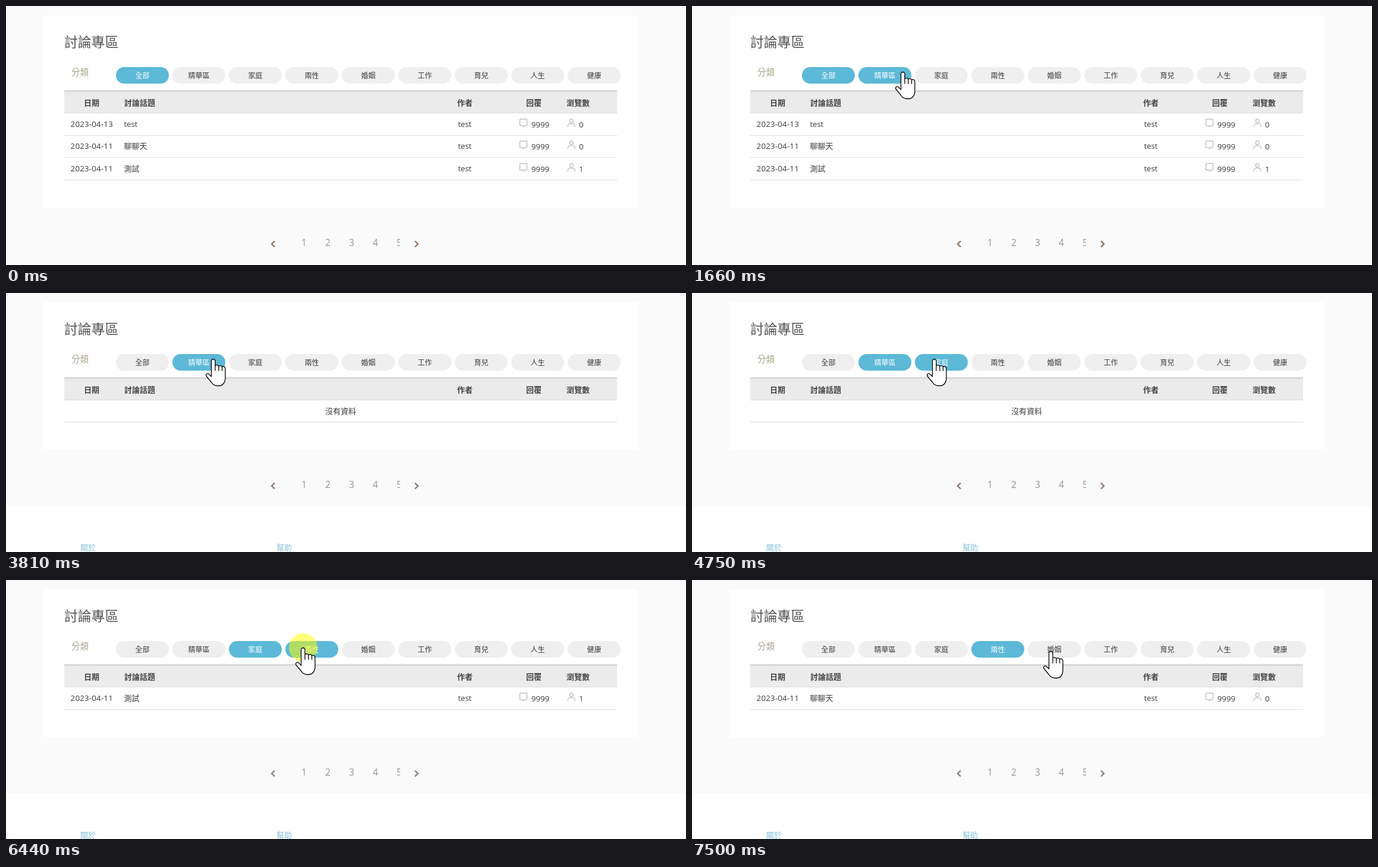
These frames come from a looping animation (1144 px wide and 437 px high, 8000 ms). An HTML page:

```html
<!DOCTYPE html>
<html lang="zh-Hant">
<head>
<meta charset="utf-8">
<title>討論專區</title>
<style>
  html, body { margin: 0; width: 100%; height: 100%; overflow: hidden; background: #fafafa; }
  #stage { display: block; width: 1144px; height: 437px; }
  text { font: 13px "Open Sans", "Noto Sans CJK TC", "Noto Sans CJK", sans-serif; fill: #3a3a3a; }
  .mid { text-anchor: middle; }
  .title { font-size: 22.8px; font-weight: 300; fill: #555; }
  .label { font-size: 14.5px; fill: #aba38f; }
  .pill { font-size: 12px; text-anchor: middle; }
  .on { fill: #fff; }
  .head { font-weight: 700; fill: #444; }
  .num { font-size: 13.3px; }
  .date { letter-spacing: .2px; }
  .page { font-size: 15.5px; fill: #939590; text-anchor: middle; }
  .foot { fill: #84c0da; }
  .icon { fill: none; stroke: #c2c2c2; stroke-width: 1.5; }
  .chevron { fill: none; stroke-width: 2.4; }
  .cursor { fill: #fff; stroke: #000; stroke-width: 1.3; stroke-linejoin: round; }
  .bare text { display: none; }
</style>
</head>
<body>
<svg id="stage" viewBox="0 0 1144 437">
  <g id="view"></g>
  <circle id="click" r="24" fill="#ff0" fill-opacity=".52"/>
  <g id="cursor" class="cursor">
    <path id="arrow" d="M1 1V32l7-6.6 5 11.6 5.5-2.4-5-11.4H24z"/>
    <path id="hand" d="M-3.500 3.700a3.200 3.200 0 0 1 6.400 0V12c1-2 5.200-2 6 .8 1-1.800 5-1.600 5.600 1 1.400-1.600 5.200-1 5.400 2.400V32c0 8-4 13.500-11 13.500h-2c-5 0-8-2-10.500-6L-11.800 29.500c-2-3.500 1.500-6 4.300-3.500L-3.500 30zM2.900 12v8.500M8.900 13v7.500M14.500 14v6.500"/>
  </g>
</svg>
<script>
const LOOP = 8000;
const categories = ['全部', '精華區', '家庭', '兩性', '婚姻', '工作', '育兒', '人生', '健康'];
const columns = [[131, '日期'], [199, '討論話題'], [759, '作者'], [875, '回覆'], [943, '瀏覽數']];
const chat = ['2023-04-11', '聊聊天', 0];
const trial = ['2023-04-11', '測試', 1];

const pages = [
  { from: 0, active: 0, rows: [['2023-04-13', 'test', 0], chat, trial], chevron: '#967462' },
  { from: 3470, textFrom: 3810, active: 1, rows: [], chevron: '#8c7a72' },
  { from: 5280, active: 2, rows: [trial], chevron: '#7a838c' },
  { from: 7500, active: 3, rows: [chat], chevron: '#7a838c' }
];

const easeOut = u => 1 - (1 - u) ** 2;
const easeInOut = u => u < .5 ? 2 * u * u : 1 - 2 * (1 - u) ** 2;

// first step, last step, number of steps, destination, easing
const moves = [
  [290, 1120, 13, 242, 145, easeOut],
  [1390, 1660, 5, 355, 111, easeInOut],
  [1930, 2070, 3, 343, 111, easeInOut],
  [3070, 3070, 1, 347, 111, easeInOut],
  [3810, 4280, 8, 408, 111, easeInOut],
  [5280, 5970, 11, 500, 114, easeInOut],
  [6820, 7300, 8, 604, 120, easeInOut]
];
const clicks = [[2340, 2480], [4680, 4750], [6440, 6570]];

const $ = id => document.getElementById(id);
const show = (id, visible) => $(id).setAttribute('visibility', visible ? 'visible' : 'hidden');
const rect = (x, y, w, h, fill, r = 0) =>
  `<rect x="${x}" y="${y}" width="${w}" height="${h}" rx="${r}" fill="${fill}"/>`;
const text = (x, y, s, cls = '') => `<text x="${x}" y="${y}" class="${cls}">${s}</text>`;
const pillX = i => 185 + 95 * i;

function pill(name, i, lit) {
  return rect(pillX(i), 103, 89, 28, lit ? '#5cb9d7' : '#efefef', 14) +
    text(pillX(i) + 44.5, 121.5, name, lit ? 'pill on' : 'pill');
}

function row([date, topic, views], i) {
  const y = Math.floor(37.5 * i);
  return `<g transform="translate(0 ${y})">` +
    text(144.3, 204, date, 'mid num date') + text(198.5, 204, topic) + text(760.5, 204, 'test') +
    text(883.7, 205, '9999', 'num') + text(964, 205, views, 'num') +
    `<path class="icon" d="M865.500 190.700h10a1 1 0 0 1 1 1v9a1 1 0 0 1-1 1h-3l-2 2-2-2h-3a1 1 0 0 1-1-1v-9a1 1 0 0 1 1-1z
      M945.300 204v-1.500a4 4 0 0 1 4-4h4a4 4 0 0 1 4 4v1.500M954.300 193.700a3 3 0 1 1-6 0a3 3 0 0 1 6 0z"/>` +
    rect(98, 218, 930, 1, '#ddd') + '</g>';
}

function pageMarkup(page, hover, chevrons) {
  const { rows, active } = page;
  const bottom = rows.length ? 265 + Math.floor(37.5 * (rows.length - 1)) : 264;
  const chevron = (x, d) => `<path class="chevron" stroke="${page.chevron}" d="M${x} ${bottom + 56.5}l${d} 5 ${-d} 5"/>`;
  return rect(63, 16, 1000, bottom - 16, '#fff') +
    rect(0, bottom + 95, 1144, 200, '#fff') +
    text(98, 68.5, '討論專區', 'title') + text(110, 117, '分類', 'label') +
    categories.map((name, i) => pill(name, i, i === active || i === hover)).join('') +
    rect(98, 142, 930, 39, '#ebebeb') + rect(98, 142, 930, 3, '#d8d8d8') + rect(98, 180, 930, 1, '#dcdcdc') +
    columns.map(([x, s]) => text(x, 168, s, 'head')).join('') +
    (rows.map(row).join('') || text(563, 204, '沒有資料', 'mid') + rect(98, 217, 930, 1, '#ddd')) +
    '<svg width="663" height="437">' +
    [1, 2, 3, 4, 5].map(n => text(461.5 + 40 * n, bottom + 65, n, 'page')).join('') + '</svg>' +
    (chevrons ? chevron(452, -5) + chevron(688, 5) : '') +
    text(125, bottom + 170, '關於', 'foot') + text(455, bottom + 170, '幫助', 'foot');
}

function pointerAt(t) {
  let x = 1179, y = 474;
  for (const [first, last, steps, toX, toY, ease] of moves) {
    if (t < first) break;
    const step = t >= last ? steps : 1 + Math.floor((t - first) * (steps - 1) / (last - first));
    const u = ease(step / steps);
    x += (toX - x) * u;
    y += (toY - y) * u;
  }
  return [Math.round(x), Math.round(y)];
}

let shown = '';
function draw(t) {
  const page = pages.findLast(p => t >= p.from);
  const [x, y] = pointerAt(t);
  const over = y >= 103 && y < 131 ? categories.findIndex((_, i) => x >= pillX(i) && x < pillX(i) + 89) : -1;
  // a freshly loaded page has no hover until the pointer moves
  const hover = t >= 7500 ? -1 : over;
  const bare = t < page.textFrom;
  const chevrons = !bare || t >= 3600;

  const key = [page.from, hover, bare, chevrons].join();
  if (key !== shown) {
    shown = key;
    $('view').innerHTML = pageMarkup(page, hover, chevrons);
    $('view').setAttribute('class', bare ? 'bare' : '');
  }
  for (const id of ['cursor', 'click']) $(id).setAttribute('transform', `translate(${x} ${y})`);
  show('hand', over >= 0);
  show('arrow', over < 0);
  show('click', clicks.some(([from, to]) => t >= from && t < to));
}

const start = performance.now();
function frame() {
  draw((performance.now() - start) % LOOP);
  requestAnimationFrame(frame);
}
frame();
</script>
</body>
</html>
```
